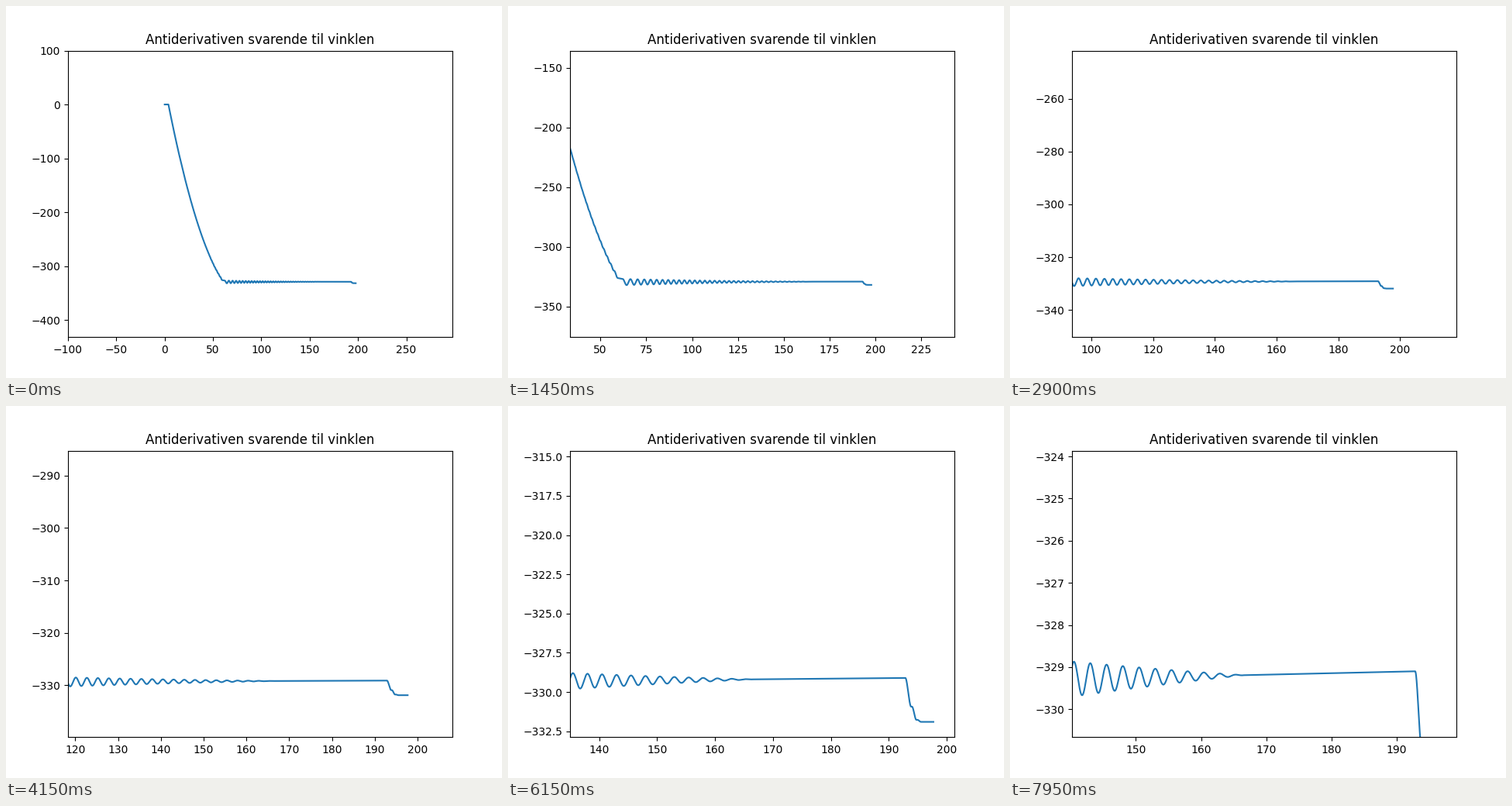
Write a matplotlib script that moves like this. It is 640 by 480 pixels and loops after 8 s.

```python
import numpy as np
import matplotlib.pyplot as plt
from matplotlib.animation import FuncAnimation

FRAMES = 160
INTERVAL = 50
DECAY = 0.02742           # zoom rate per frame

# Axis limits at the start and where the zoom is heading
X_START, X_END = np.array([-100, 297.7]), np.array([143.3, 197.9])
Y_START, Y_END = np.array([-431.95, 100]), np.array([-329.35, -329.35])

SPIN_START, SPIN_END = 3.9, 59.7
SWING_START, SWING_END = 62.2, 166.6
DROP_START, DROP_END = 192.85, 197.7

TOP = -326.2              # angle of the last pass over the top
PERIOD = 2.482            # of small swings
LAST_PEAK = 165.4


def spin(t):
    """Rotation slowing down, lingering at the top of each turn."""
    u = t - SPIN_START
    base = -9.02 * u + 0.0568 * u**2
    speed = 9.02 - 0.1136 * u
    wobble = np.minimum(0.9, 6.3 / speed**2)
    return base - wobble * np.sin(base - TOP)


def rest(t):
    """Resting angle with the slow drift of the sensor."""
    return -329.1 - 0.0035 * (DROP_START - t)


def agm(a, b):
    for _ in range(4):
        a, b = (a + b) / 2, np.sqrt(a * b)
    return a


def swing(t):
    """Damped pendulum: wide swings take longer than small ones."""
    amp = 1.24 * (np.exp(0.011 * (SWING_END - t)) - 1)
    rate = 2 * np.pi / PERIOD * agm(1, np.cos(amp / 2))
    phase = np.cumsum(rate) * (t[1] - t[0])
    phase -= np.interp(LAST_PEAK, t, phase)
    return rest(t) + amp * np.cos(phase)


def drop(t):
    """Fall to a lower level in three fading steps (start, width, height)."""
    y = np.full_like(t, rest(DROP_START))
    for start, width, height in [(0, 1, 1.83), (1.15, 0.75, 0.84),
                                 (2.1, 0.6, 0.13)]:
        p = np.clip((t - DROP_START - start) / width, 0, 1)
        y -= height * p * p * (3 - 2 * p)
    return y


def build_curve():
    parts = [(spin, SPIN_START, SPIN_END, 900),
             (swing, SWING_START, SWING_END, 4000),
             (drop, DROP_START, DROP_END, 200)]
    ts, ys = [[0]], [[0]]
    for func, start, end, count in parts:
        t = np.linspace(start, end, count)
        ts.append(t)
        ys.append(func(t))
    return np.concatenate(ts), np.concatenate(ys)


fig, ax = plt.subplots(figsize=(6.4, 4.8), dpi=100)
line, = ax.plot(*build_curve())
ax.set_title("Antiderivativen svarende til vinklen")


def update(i):
    k = np.exp(-DECAY * i)
    ax.set_xlim(X_END + (X_START - X_END) * k)
    ax.set_ylim(Y_END + (Y_START - Y_END) * k)
    return line,


anim = FuncAnimation(fig, update, frames=FRAMES, interval=INTERVAL,
                     init_func=lambda: update(0), repeat=True,
                     repeat_delay=0, blit=False)
plt.show()
```
